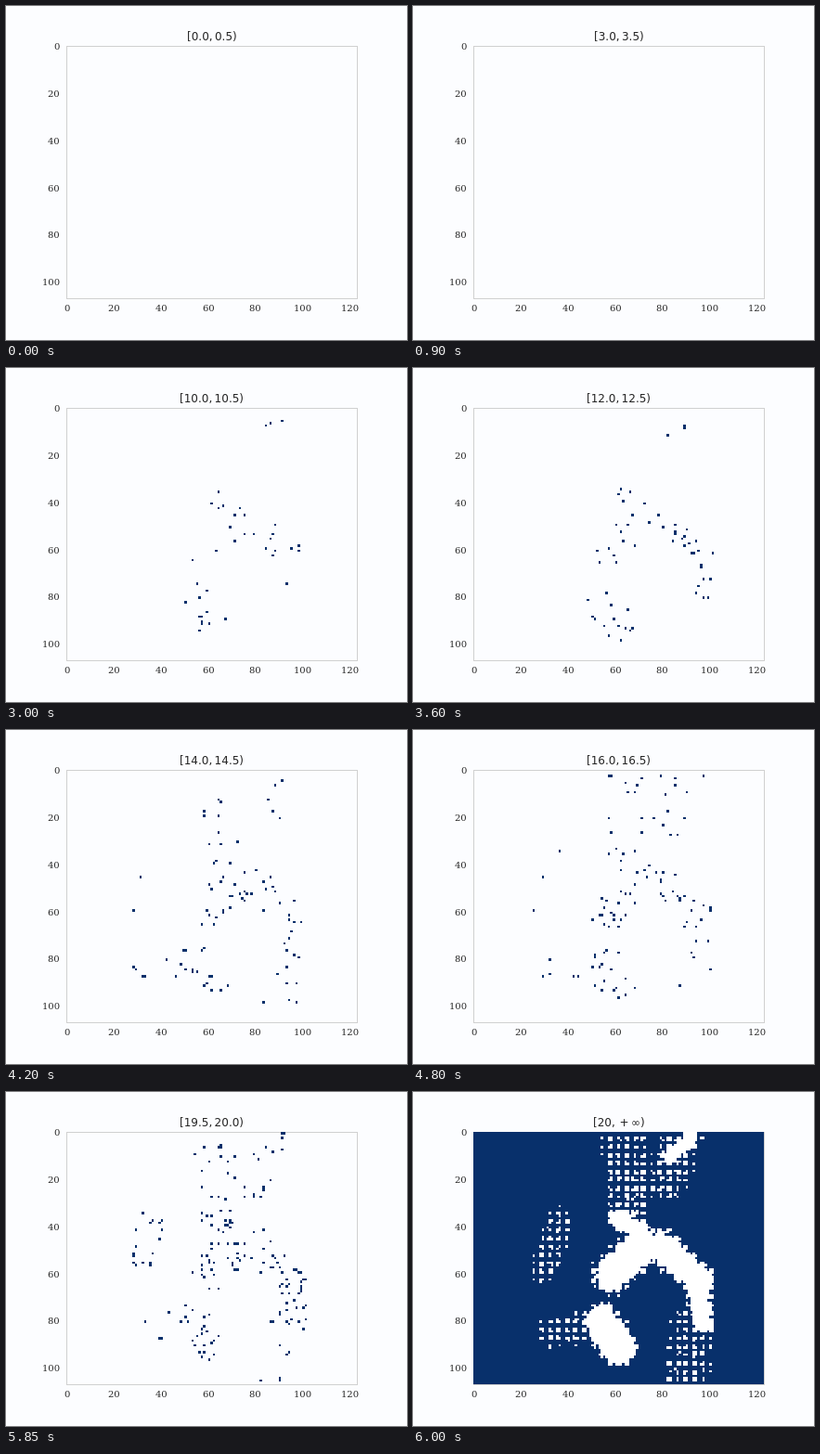
Recreate the animation shown at these times as an HTML page with a canvas. Size 432 px wide and 360 px high, loop 6.15 s.

```html
<!DOCTYPE html>
<html lang="en">
<head>
<meta charset="utf-8">
<style>
  html, body { margin: 0; width: 100%; height: 100%; overflow: hidden; background: #fcfdff; }
  canvas { display: block; }
</style>
</head>
<body>
<canvas id="plot" width="432" height="360"></canvas>
<script>
const ctx = document.getElementById('plot').getContext('2d');
const COLS = 123, ROWS = 107, CELL = 2.542, LEFT = 65, TOP = 43;
const STEP = 150, BINS = 40, FIRST_BIN = 7;
const PAPER = '#fcfdff', NAVY = '#08306b', INK = '#262626', FRAME = '#d0d0d0';

// Capsules: end points x1, y1, x2, y2 and radius
const solids = [
  [71, 48, 58, 60, 5],
  [79, 48, 95, 62, 4],
  [61, 36, 70, 42, 2],
  [95, 67, 97, 81, 2],
  [54, 80, 61, 91, 5],
  [92, 2, 83, 10, 1]
];
const halos = [
  [63, 0, 66, 30, 8],
  [88, 0, 82, 20, 8],
  [36, 37, 30, 58, 5],
  [34, 84, 50, 82, 6],
  [92, 82, 90, 104, 8]
];

function random(x, y, salt) {
  let h = Math.imul(x + 1, 374761393) ^ Math.imul(y + 1, 668265263) ^ Math.imul(salt, 974634777);
  h = Math.imul(h ^ h >>> 15, 2246822519);
  h = Math.imul(h ^ h >>> 13, 3266489917);
  return ((h ^ h >>> 16) >>> 0) / 4294967296;
}

// Depth below the surface of a capsule, negative outside
function depth(x, y, [x1, y1, x2, y2, radius]) {
  const dx = x2 - x1, dy = y2 - y1;
  const along = ((x - x1) * dx + (y - y1) * dy) / (dx * dx + dy * dy);
  const t = Math.min(1, Math.max(0, along));
  return radius - Math.hypot(x - x1 - t * dx, y - y1 - t * dy);
}

function density(x, y) {
  const solid = Math.max(...solids.map(c => 1.3 + depth(x, y, c) / 4));
  const halo = Math.max(...halos.map(c => Math.min(.5, .35 + depth(x, y, c) / 8)));
  return Math.max(solid, halo);
}

// 0 on a lattice line, 1 halfway between two lines
function offLattice(v, anchor, spacing) {
  const q = (v - anchor) / spacing;
  return 2 * Math.abs(q - Math.round(q));
}

// Bin in which a cell fires, or -1 if it never does
function firingBin(x, y) {
  const d = density(x, y);
  const gap = Math.max(offLattice(x, 57.3, 3.6), offLattice(y, 34, 3.53));
  if (d <= .1 || gap + (random(x, y, 1) - .5) * .3 > d) return -1;
  const delay = Math.max(0, .5 * (1 - d));
  const u = delay + (1 - delay) * random(x, y, 2);
  return Math.floor(FIRST_BIN + (BINS - FIRST_BIN) * u ** .4);
}

const bins = Array.from({ length: BINS }, () => []);
for (let y = 0; y < ROWS; y++) {
  for (let x = 0; x < COLS; x++) {
    const bin = firingBin(x, y);
    if (bin >= 0) bins[bin].push([x, y]);
  }
}

function fillCell([x, y]) {
  const edge = (start, i) => Math.round(start + i * CELL);
  const px = edge(LEFT, x), py = edge(TOP, y);
  ctx.fillRect(px, py, edge(LEFT, x + 1) - px, edge(TOP, y + 1) - py);
}

// Text on whole pixels; align is 0 for left, .5 for centre, 1 for right
function label(text, x, y, align) {
  ctx.fillText(text, Math.round(x - ctx.measureText(text).width * align), Math.round(y));
}

function drawLabels(title) {
  ctx.fillStyle = INK;
  ctx.font = '10px "DejaVu Serif", serif';
  for (let v = 0; v <= 120; v += 20) label(v, 66 + v * 2.535, 329, .5);
  for (let v = 0; v <= 100; v += 20) label(v, 58, 47 + v * CELL, 1);
  ctx.font = '12px "DejaVu Sans", sans-serif';
  label(title, 222, 37, .5);
}

function draw() {
  const bin = Math.floor(performance.now() / STEP) % (BINS + 1);
  const last = bin === BINS;
  ctx.fillStyle = PAPER;
  ctx.fillRect(0, 0, 432, 360);
  ctx.strokeStyle = FRAME;
  ctx.strokeRect(65.5, 43.5, 313, 272);
  if (last) {
    ctx.fillStyle = NAVY;
    ctx.fillRect(LEFT, TOP, 313, 272);
  }
  ctx.fillStyle = last ? '#ffffff' : NAVY;
  (last ? bins.flat() : bins[bin]).forEach(fillCell);
  const from = bin / 2;
  drawLabels(last ? '[20,\u2009\u2009+\u2009∞)' : `[${from.toFixed(1)},\u2009${(from + .5).toFixed(1)})`);
  requestAnimationFrame(draw);
}
draw();
</script>
</body>
</html>
```
